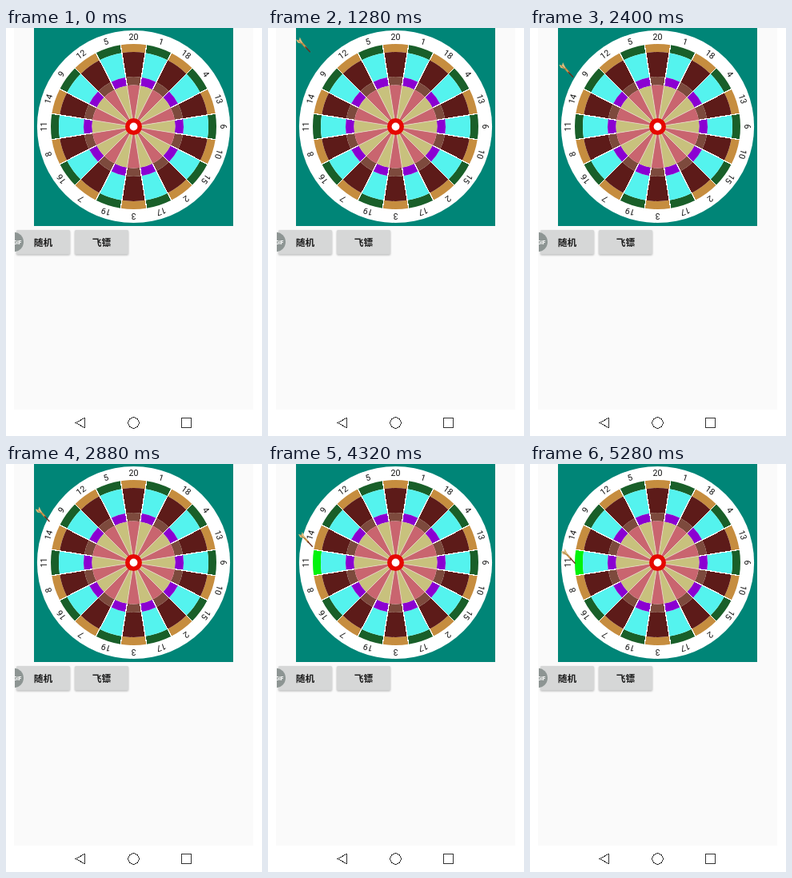
These frames come from a looping animation (320 by 511 pixels, 9.6 s). An HTML page:

```html
<!DOCTYPE html>
<html lang="zh">
<head>
<meta charset="utf-8">
<title>Dartboard</title>
<style>
html, body { margin: 0; width: 100%; height: 100%; overflow: hidden; background: #fff; }
svg { display: block; width: 100vw; height: 100vh; }
text { text-anchor: middle; }
.num { font: 10.6px Roboto, sans-serif; fill: #111; }
.label { font: 700 11.7px "Noto Sans CJK SC", "Noto Sans CJK", sans-serif; fill: #1c1c1c; }
.badge { font: 700 6.5px Roboto, sans-serif; fill: #fff; }
</style>
</head>
<body>
<svg viewBox="0 0 320 511">
  <defs>
    <filter id="soft" x="-20%" y="-30%" width="140%" height="170%"><feGaussianBlur stdDeviation="1"/></filter>
    <clipPath id="panel"><rect x="11" width="298" height="478"/></clipPath>
    <clipPath id="field"><rect x="35" width="249" height="248"/></clipPath>
  </defs>
  <rect width="320" height="511" fill="#fff"/>
  <rect x="10" width="299" height="478" fill="#fafafa"/>
  <rect x="35" width="249" height="248" fill="#008577"/>
  <g id="board" transform="translate(159.5 123.5)"></g>
  <g clip-path="url(#field)">
    <g id="dart" stroke-linecap="round">
      <path d="M6 6 12.5 13.2" stroke="#c8954c" stroke-width="2.4"/>
      <path d="M12 12.8 17.6 18.8" stroke="#6b2c1c" stroke-width="1.3"/>
      <path d="M.3 3.4 4 4.2 5 .6 8.3 7.3 7.2 8.6 2.5 7.5Z" fill="#dcbc7c"/>
      <path d="M3 4.8 8.5 9.4" stroke="#94642f" stroke-width=".8"/>
    </g>
  </g>
  <g id="buttons"></g>
  <g clip-path="url(#panel)">
    <circle cx="9.8" cy="268" r="12.2" fill="#8d9593"/>
    <text class="badge" x="14.5" y="270.6">GIF</text>
  </g>
  <g fill="none" stroke="#333" stroke-width="1" shape-rendering="crispEdges">
    <path d="M87.3 494.5 98.3 488.3V500.7Z"/>
    <circle cx="159.5" cy="494.5" r="6.8"/>
    <rect x="219.5" y="488.5" width="12" height="12"/>
  </g>
</svg>
<script>
const LOOP = 9600;
const NUMBERS = [20, 1, 18, 4, 13, 6, 10, 15, 2, 17, 3, 19, 7, 16, 8, 11, 14, 9, 12, 5];
const RADII = [103.5, 93.5, 62.5, 52, 0];
const COLORS = [
  ['#c68d3f', '#5d1b19', '#7d4a3d', '#c9656f'],
  ['#195f29', '#54f3ee', '#8b00d2', '#c8c17d']
];
const GREEN = COLORS[1][0];
const LIT = '#00f20c';

function add(parent, tag, attrs, text) {
  const el = document.createElementNS('http://www.w3.org/2000/svg', tag);
  for (const key in attrs) el.setAttribute(key, attrs[key]);
  if (text !== undefined) el.textContent = text;
  parent.appendChild(el);
  return el;
}

// Ring sector centred on "up"; each slice is rotated into place.
function sector(outer, inner) {
  const half = Math.PI / 20;
  const at = (r, a) => `${(r * Math.sin(a)).toFixed(2)} ${(-r * Math.cos(a)).toFixed(2)}`;
  return `M${at(outer, -half)}A${outer} ${outer} 0 0 1 ${at(outer, half)}` +
    `L${at(inner, half)}A${inner} ${inner} 0 0 0 ${at(inner, -half)}Z`;
}

const board = document.getElementById('board');
add(board, 'circle', { r: 120.6, fill: '#fff' });
let target;
NUMBERS.forEach((n, i) => {
  const slice = add(board, 'g', { transform: `rotate(${i * 18})` });
  COLORS[i % 2].forEach((fill, ring) => {
    const part = add(slice, 'path', { d: sector(RADII[ring], RADII[ring + 1]), fill });
    if (n === 11 && ring === 0) target = part;
  });
  add(slice, 'text', { class: 'num', y: -108.2 }, n);
});
NUMBERS.forEach((n, i) => {
  const transform = `rotate(${i * 18 + 9})`;
  add(board, 'path', {
    d: 'M0-52V-104', stroke: '#fff', 'stroke-width': 1.3, 'shape-rendering': 'crispEdges', transform
  });
  add(board, 'path', { d: 'M0 0V-52', stroke: '#eee4d8', 'stroke-width': 0.6, transform });
});
add(board, 'circle', { r: 10.5, fill: '#e60800' });
add(board, 'circle', { r: 4.9, fill: '#fff' });

function button(x, label) {
  const g = add(document.getElementById('buttons'), 'g', { transform: `translate(${x} 253)` });
  const box = { width: 67, height: 30.5, rx: 1.5 };
  const shadow = add(g, 'rect', { ...box, y: 1, opacity: 0.28, filter: 'url(#soft)' });
  add(g, 'rect', { ...box, fill: '#d6d7d7' });
  add(g, 'text', { class: 'label', x: 33.5, y: 19.8 }, label);
  return shadow;
}
button(13, '随机');
const pressShadow = button(86, '飞镖');
const dart = document.getElementById('dart');

// The dart advances in equal hops: one short hold, then 480 ms each.
function hop(t) {
  return t < 1440 ? 0 : Math.min(9, 1 + Math.floor((t - 1440) / 480));
}

function draw(t) {
  const pressed = t >= 800 && t < 1120;
  pressShadow.setAttribute('y', pressed ? 2 : 1);
  const k = hop(t);
  dart.setAttribute('visibility', t < 1280 ? 'hidden' : 'visible');
  dart.setAttribute('transform', `translate(${34.8 + 0.42 * k} ${11 + 10.5 * k})`);
  target.setAttribute('fill', t >= 3840 ? LIT : GREEN);
}

const start = performance.now();
function tick() {
  draw((performance.now() - start) % LOOP);
  requestAnimationFrame(tick);
}
tick();
</script>
</body>
</html>
```
